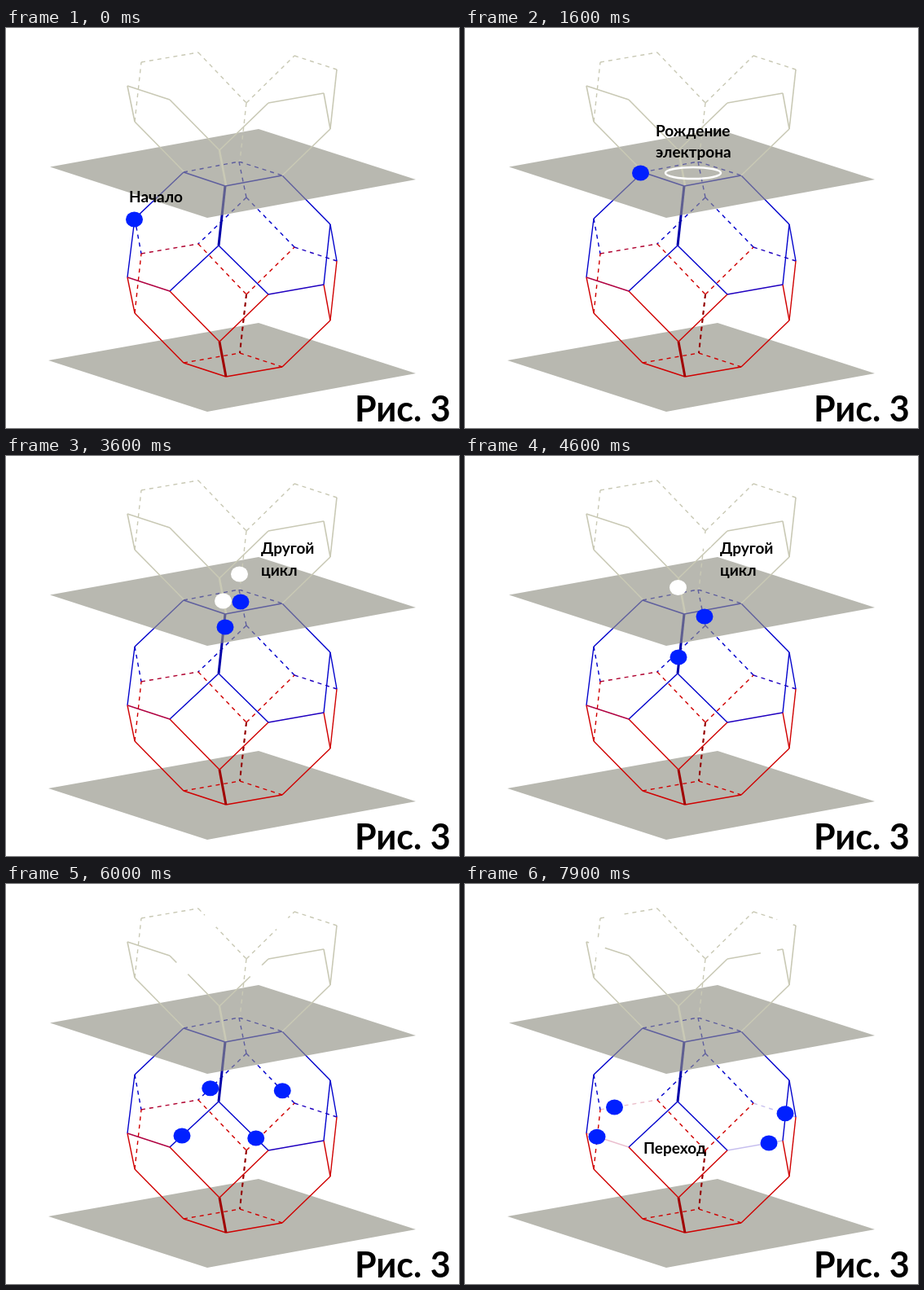
Write an HTML page with a canvas that moves like this. It is 556 px wide and 491 px high and loops after 8 s.

```html
<!DOCTYPE html>
<html lang="ru">
<head>
<meta charset="utf-8">
<style>
html, body { margin: 0; width: 100%; height: 100%; overflow: hidden; background: #fff; }
canvas { display: block; }
</style>
</head>
<body>
<canvas id="stage" width="556" height="491"></canvas>
<script>
const ctx = document.getElementById('stage').getContext('2d');
const LOOP = 8000, RISE = 235;
const BLUE = '#0000cc', RED = '#d00000', BEIGE = '#c9c9b5', BALL = '#0020ff';

// Vertices of the truncated octahedron, projected
const V = {
  A: [218, 177], B: [286, 164], C: [339, 181], D: [269, 194],
  E: [158, 234], F: [261, 267], G: [295, 208], H: [398, 241],
  I: [149, 306], J: [158, 350], K: [166, 277], L: [201, 323],
  M: [262, 385], N: [322, 327], O: [390, 315], P: [398, 359],
  Q: [406, 286], R: [236, 265], S: [295, 327], T: [354, 269],
  U: [218, 411], V: [270, 428], W: [339, 416], X: [287, 399]
};
const raised = ([x, y]) => [x, y - RISE];

function edges(list, color, { dash = false, width = 1.4, up = false, alpha = 1 } = {}) {
  ctx.save();
  ctx.strokeStyle = color;
  ctx.lineWidth = width;
  ctx.globalAlpha = alpha;
  ctx.setLineDash(dash ? [5, 5] : []);
  for (const [a, b] of list.split(' ')) {
    const [p, q] = [V[a], V[b]].map(v => up ? raised(v) : v);
    ctx.beginPath();
    ctx.moveTo(...p);
    ctx.lineTo(...q);
    ctx.stroke();
  }
  ctx.restore();
}

function plane(points, color) {
  ctx.fillStyle = color;
  ctx.beginPath();
  points.forEach(p => ctx.lineTo(...p));
  ctx.fill();
}

function ball([x, y], color) {
  ctx.fillStyle = color;
  ctx.beginPath();
  ctx.ellipse(x, y, 10.5, 9.5, 0, 0, Math.PI * 2);
  ctx.fill();
}

function label(text, x, y, size = 19) {
  ctx.font = `bold ${size}px Lato, "Open Sans", sans-serif`;
  ctx.fillStyle = '#000';
  ctx.fillText(text, x, y);
}

const mix = (p, q, k) => p.map((v, i) => v + (q[i] - v) * k);

// Keys are [time, ...values], linear in between
function track(keys, t) {
  let i = 0;
  while (i < keys.length - 2 && t >= keys[i + 1][0]) i++;
  const [t0, ...a] = keys[i], [t1, ...b] = keys[i + 1];
  return mix(a, b, Math.min(1, Math.max(0, (t - t0) / (t1 - t0))));
}

const START = [[0, 157.5, 235], [900, 187.5, 207.5], [1600, 215.5, 178]];
const BLUE_FRONT = [[1900, 215.5, 178], [3100, 269, 194], [3600, 269, 210], [4600, 262, 247], [4800, 261, 266]];
const BLUE_BACK = [[1900, 215.5, 178], [3100, 286, 164], [3600, 288, 179], [4600, 294, 197], [4800, 295, 208]];
const WHITE_FRONT = [[3100, 269, 194], [3600, 266.5, 178], [4600, 261.5, 161.5], [4800, 261, 149]];
const WHITE_BACK = [[3100, 286, 164], [3600, 286.5, 145], [4600, 294, 104.5], [4800, 294, 91.5]];
const RING = [[1900, 280, 178, 34, 7], [2800, 281.5, 180.5, 8.5, 4.3], [3100, 282, 181, 0, 0]];

// The picture advances in 100 ms steps, with longer holds
function stepped(t) {
  if (t >= 1600 && t < 2000) return 1600;
  const step = t >= 4800 && t < 6800 ? 400 : 100;
  return Math.floor(t / step) * step;
}

function scene(fade) {
  ctx.fillStyle = '#fff';
  ctx.fillRect(0, 0, 556, 491);
  plane([[52, 408], [310, 362], [503, 424], [247, 471]], '#b8b8b0');

  edges('EK BG GR GT', BLUE, { dash: true });
  edges('AB BC', BLUE, { dash: true });
  edges('JK RS ST SX UX XW', RED, { dash: true });
  edges('KR', '#b00030', { dash: true, alpha: fade });
  edges('TQ', '#2000c0', { dash: true, alpha: fade });
  edges('SX', '#900000', { dash: true, width: 2 });
  edges('AD DC AE CH EI HO HQ FL FN', BLUE);
  edges('IJ LM MN OP PQ JU PW UV VW', RED);
  edges('IL', '#b00040', { alpha: fade });
  edges('NO', '#2000c0', { alpha: fade });
  edges('DF', '#0000a8', { width: 3 });
  edges('MV', '#a00000', { width: 3 });

  plane([[54, 170.5], [310, 124], [503, 186], [247, 233]], 'rgba(146,146,134,.65)');
  edges('JK KR RS ST TQ SX', BEIGE, { dash: true, up: true });
  edges('IJ JU IL LM MN NO OP PQ PW', BEIGE, { up: true, width: 1.6 });
  edges('MV', BEIGE, { up: true, width: 2.5 });
}

function balls(t) {
  if (t <= 1600) return ball(track(START, t), BALL);
  if (t < 4800) {
    if (t >= 3100) {
      ball(track(WHITE_BACK, t), '#fff');
      ball(track(WHITE_FRONT, t), '#fff');
    }
    ball(track(BLUE_BACK, t), BALL);
    ball(track(BLUE_FRONT, t), BALL);
    return;
  }
  const apart = t <= 6400;
  const k = apart ? (t - 4800) / 1600 : (t - 6700) / 1600;
  const blue = apart ? 'GR GT FL FN' : 'RK TQ LI NO';
  const white = apart ? 'SR ST ML MN' : 'RK TQ LI NO';
  for (const [a, b] of white.split(' ')) ball(raised(mix(V[a], V[b], k)), '#fff');
  for (const [a, b] of blue.split(' ')) ball(mix(V[a], V[b], k), BALL);
}

function ring(t) {
  const [x, y, rx, ry] = track(RING, t);
  ctx.strokeStyle = '#fff';
  ctx.lineWidth = 2.5;
  ctx.beginPath();
  ctx.ellipse(x, y, rx, ry, 0, 0, Math.PI * 2);
  ctx.stroke();
}

function labels(t) {
  if (t < 1600) label('Начало', 151, 214);
  else if (t < 3100) {
    label('Рождение', 234, 133);
    label('электрона', 234, 159);
  } else if (t < 4800) {
    label('Другой', 313, 120);
    label('цикл', 313, 147);
  } else if (t >= 6400) label('Переход', 219, 331);
  label('Рис. 3', 428, 483, 43);
}

function draw(now) {
  const t = stepped(now % LOOP);
  scene(t >= 6800 ? 1 - (t - 6700) / 1600 : 1);
  if (t >= 1600 && t < 3100) ring(t);
  balls(t);
  labels(t);
  requestAnimationFrame(draw);
}
requestAnimationFrame(draw);
</script>
</body>
</html>
```
